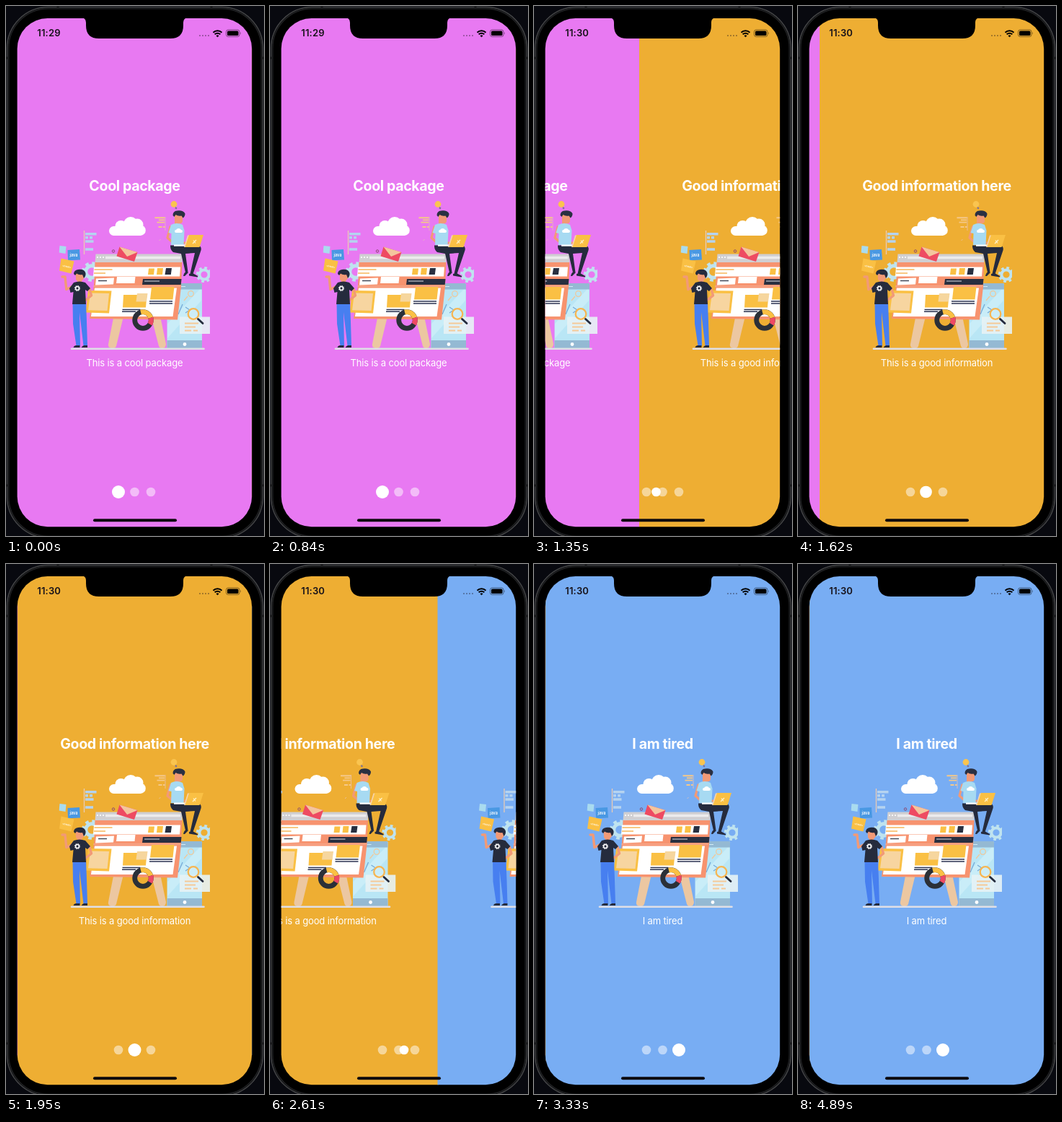
An HTML page for the animation above (4950 ms loop, 358 by 734 pixels).

```html
<!DOCTYPE html>
<html lang="en">
<head>
<meta charset="utf-8">
<title>Onboarding swipe</title>
<style>
  html, body { margin: 0; width: 100%; height: 100%; overflow: hidden; background: #08090f; }
  svg { display: block; width: 100%; height: 100%; font-family: Inter, "Open Sans", sans-serif; }
  .title { font-size: 19.6px; font-weight: 700; letter-spacing: -.37px; }
  .subtitle { font-size: 13px; letter-spacing: -.14px; }
  .title, .subtitle { fill: #fff; text-anchor: middle; }
</style>
</head>
<body>
<svg viewBox="0 0 358 734">
  <defs>
    <clipPath id="screen"><rect x="15.600" y="17" width="325.600" height="704.300" rx="42"/></clipPath>
    <clipPath id="artBox"><rect x="73.500" y="265" width="209.500" height="212"/></clipPath>

    <g id="gear" fill="none" stroke="#bfe3ef">
      <circle r="6.600" stroke-width="4"/>
      <circle r="9.300" stroke-width="3.600" stroke-dasharray="3.650 3.650"/>
    </g>

    <g id="art" clip-path="url(#artBox)">
      <!-- cloud -->
      <g fill="#fff">
        <circle cx="149.500" cy="311.500" r="6.500"/><circle cx="159.500" cy="305" r="8"/>
        <circle cx="173" cy="302" r="10"/><circle cx="182" cy="303" r="8.500"/>
        <circle cx="186.500" cy="310.700" r="7.300"/><rect x="149" y="305" width="38" height="13"/>
      </g>

      <!-- flow chart and code lines -->
      <path stroke="#e9cbb5" stroke-width="1.300" d="M108.500 311v33"/>
      <path stroke="#b5d3f0" stroke-width="3.600" d="M110 315.800h15.500M110 320.800h4M116 320.800h4M110 326h11.500M110 337h11"/>
      <path stroke="#f5c888" stroke-width="1.900" d="M206.500 293.200h14M212 296.400h8M209.500 299.600h10.500M211.500 306h5M218 306h2.500"/>
      <path stroke="#e6c0b2" stroke-width=".8" d="M221 292v19M212.500 325l2-2"/>

      <use href="#gear" transform="translate(119 368) scale(1.250)"/>
      <use href="#gear" x="275" y="372"/>

      <!-- device behind the board -->
      <rect x="223.500" y="384" width="48.500" height="90" rx="1.500" fill="#b9e6f5"/>
      <path fill="#c9edf8" d="M224 440l47-50v18l-47 52Z"/>
      <path fill="#94b9d3" d="M223.500 392.500V385.500q0-1.500 1.500-1.500h45.500q1.500 0 1.500 1.500v7ZM223.500 463H272v11h-48.500Z"/>
      <path stroke="#d3edf7" d="M238 388.500h11"/>
      <circle cx="248" cy="468.500" r="2.400" fill="#fff"/>
      <g fill="none" stroke="#76abd8" stroke-width="1.300">
        <path d="M239 427l6-14M249 417l6 4-6 4"/>
        <path stroke="#efc99c" d="M247 408l5-6"/>
        <circle cx="256.500" cy="398.500" r="3.800" stroke="#efc99c"/>
      </g>
      <rect x="241" y="430.500" width="42" height="23.500" fill="#e7f3f5" opacity=".9"/>
      <path stroke="#f5ca98" stroke-width="2" d="M248 439.500h19M248 444.500h15M248 449.500h9M260 449.500h6"/>
      <circle cx="260" cy="426.500" r="7.300" fill="#d9f2f9" fill-opacity=".6" stroke="#f6b653" stroke-width="2.300"/>
      <path stroke="#242b3d" stroke-width="2.800" stroke-linecap="round" d="M266.500 433.500l6.500 6"/>

      <!-- easel legs and ground -->
      <path fill="#ecc7a1" d="M149 432h13.500L153 471q-2 4-7 3t-4-6ZM202 432h12.500l7.500 36q0 5-4 6t-6-3Z"/>
      <path stroke="#dfdfe6" stroke-width="2.600" stroke-linecap="round" d="M91 474.800h183.500"/>

      <!-- board -->
      <path fill="#d0cfd2" d="M124.500 343.500H245l-.700 12H123.500Z"/>
      <path stroke="#ecebec" stroke-width="3.500" d="M138 348.500h104"/>
      <g fill="#fff"><circle cx="127" cy="348" r="1.100"/><circle cx="131" cy="348" r="1.100"/><circle cx="135" cy="348" r="1.100"/></g>
      <path fill="#f7936f" d="M123.500 355H244.500L243 388.500 238 434.500 116 433l6-46Z"/>
      <path fill="#fff" d="M122 361.500H242l-1 13H121ZM125 377.500l25-1-1 9-25 1ZM154 375h25.500l-1 9H153Z"/>
      <path stroke="#f7b85c" stroke-width="1.500" d="M122.500 365h25M122 370h16"/>
      <path fill="#fac044" d="M198 363.500h8l-1 8.500h-8ZM210 363h8l-1 9h-8Z"/>
      <path fill="#282f40" d="M222 363h8l-1.200 9H220.500ZM190 378h53.500l-.8 8H189Z"/>
      <path stroke="#434a59" stroke-width="1.500" d="M128 380.500h12"/>
      <path stroke="#e3e3e8" stroke-width="1.200" d="M192 381h21"/>
      <path stroke="#f5b29b" d="M121 388h121"/>
      <path fill="#fff" d="M123 390.500H237L231.500 430H118Z"/>

      <!-- board panels -->
      <path fill="#fac044" d="M114 394l32.500.500-3.500 31-32.500-1Z"/>
      <path fill="#f7d5a0" d="M117 397.500l26 .500-2.500 24-26.500-.800Z"/>
      <path fill="#fac044" d="M163 400h32.500l-1.500 17.500H162ZM202 389h31.500l-2 17.500H200Z"/>
      <path fill="#f6d69e" d="M182 398h14.500l-1.500 11.500H180.500Z"/>
      <path stroke="#2b3351" stroke-width="1.400" d="M199 409h32M199 412h32M161.500 420.500h25M161 423.300h19"/>
      <g fill="none" stroke-width="6.800" transform="translate(190 435)">
        <circle r="11.300" stroke="#2b3038"/>
        <path stroke="#fac044" d="M-3-10.900A11.300 11.300 0 0 1 10.800-3.200"/>
        <path stroke="#ee4964" d="M10.800-3.200A11.300 11.300 0 0 1 9.800 5.700"/>
      </g>

      <!-- envelope -->
      <path fill="#ee4b62" d="M157.500 333.500l25 7.500-4.500 13-24.500-7.500Z"/>
      <path fill="#f4c59d" d="M157.500 333.500l25 7.500-14.500 6Z"/>
      <circle cx="149" cy="339.500" r="1.700" fill="none" stroke="#8a476f"/>

      <!-- floating cards -->
      <path fill="#a9dbef" d="M74.500 332l9 1-1 10-9-1.500Z"/>
      <path fill="#4998e3" d="M85.500 338l16.500-1 1 14.500-17 .800Z"/>
      <path fill="#fac044" d="M76.500 349.500l18 4-4 17-16.500-4Z"/>
      <g fill="#fff" text-anchor="middle" font-weight="600">
        <text x="94" y="347" font-size="5.500">java</text>
        <text x="84" y="362" font-size="3.500" transform="rotate(12 84 362)">&lt;html&gt;</text>
      </g>

      <!-- standing person -->
      <g fill="none" stroke="#f29a76" stroke-linecap="round" stroke-linejoin="round">
        <path stroke-width="3.400" d="M78 375h4l1.800 17.500 8-4"/>
        <path stroke-width="3.400" d="M116 392l2.500 9-9 7"/>
      </g>
      <path fill="#f29a76" d="M96.500 369h11.500v8l-3 4v4h-6v-4l-2-2Z"/>
      <path fill="#252b3d" d="M94 371q0-5 6-6 9-1 10.500 5 .5 4-2.500 7l-2-5q-5 1-8-1.500l-2 2.500Z"/>
      <path fill="#477ff0" d="M92.500 411h18.500l1 26 1 33.500h-5.500L102 424l1 46.500h-5.500L93 440Z"/>
      <path fill="#252b3d" d="M94 383q8-3 16 0l7 8-4 4-3-2 1 20H92l1.500-17-4 1-1.500-6ZM93.500 473q1-3 4-3h5v3ZM104.500 473q2-3 4-3h4.500v3Z"/>
      <circle cx="99" cy="391" r="2.400" fill="none" stroke="#fff" stroke-width="1.500"/>
      <circle cx="99" cy="391" r="3.700" fill="none" stroke="#fff" stroke-width="1" stroke-dasharray="1.450"/>

      <!-- seated person with laptop -->
      <circle cx="233" cy="274.500" r="4.400" fill="#fac44f"/>
      <path fill="#7f7394" d="M235 278l2.500 1.500-1 2-2-1Z"/>
      <path fill="#f29a76" d="M234 289h11v9q-1 4-5 3l-1 4h-5Z"/>
      <path fill="#2a3042" d="M231.500 290q0-6 6-6.500 8-1 11 4 0 4-3 6l-2-3q-5 1-8-1.500l-2 3Z"/>
      <path fill="none" stroke="#f29a76" stroke-width="3.200" stroke-linecap="round" stroke-linejoin="round" d="M228 306l-4 15 9 8 15-1"/>
      <path fill="#a7daf2" d="M229 303q8-4 16 0l2.500 8-1 20H229l.500-16-4-1Z"/>
      <path fill="#fff" d="M236 314a2 2 0 0 1 0-4 4 4 0 0 1 7 0 2 2 0 0 1 0 4Z"/>
      <path fill="#252b3d" d="M228 331.500h38q6 1 4.500 7L259.500 371h-4L262 342l-13 1 3.500 26h-3.500L243 343l-11-2q-4-3-4-9ZM246 374q1-5 4-6l3 1-5 5ZM254 371l5-1 7 4v1.500l-12-2Z"/>
      <path fill="#fff" d="M233 330.500h22v2.200h-22Z"/>
      <path fill="#f7d4ac" d="M252 317.500h3L250 334h-3Z"/>
      <path fill="#fac044" d="M254 317h20l-5.500 17H248.500Z"/>
      <path stroke="#fff3cd" stroke-width="1.200" d="M259 329l5-5M260 324.500l3 4"/>
    </g>
  </defs>

  <!-- phone body -->
  <rect x="1.500" y="1.500" width="355" height="735" rx="57" fill="#000" stroke="#454648" stroke-width="1.500"/>
  <rect x="3.500" y="3.500" width="351" height="731" rx="55" fill="none" stroke="#1d1e20" stroke-width="2"/>
  <path stroke="#1a1b1d" stroke-width="3" d="M0 72h4M354 72h4M72 0v4M285 0v4M0 664h4M354 664h4"/>

  <g clip-path="url(#screen)">
    <g id="pages"></g>
    <g id="dots" fill="#fff"></g>
    <rect x="121" y="710.200" width="116" height="4" rx="2" fill="#0b080c"/>
  </g>

  <path d="M105 16Q111 17 111 23v4q0 18 18 18h99q18 0 18-18v-4q0-6 6-7Z"/>

  <!-- status bar -->
  <g fill="#17121a">
    <text id="clock" x="43.300" y="42.300" font-size="13" font-weight="600" letter-spacing=".150"></text>
    <g opacity=".45">
      <circle cx="269" cy="41" r="1"/><circle cx="273" cy="41" r="1"/><circle cx="277" cy="41" r="1"/><circle cx="281" cy="41" r="1"/>
    </g>
    <g fill="none" stroke="#000" stroke-width="2">
      <path d="M287.500 36.800a8.600 8.600 0 0 1 12 0M289.700 39.300a5.300 5.300 0 0 1 7.600 0"/>
    </g>
    <path fill="#000" d="M291.500 41.200a3 3 0 0 1 4 0l-2 2Z"/>
    <rect x="305.500" y="33" width="18.500" height="9.500" rx="2.800" fill="none" stroke="#000" stroke-opacity=".45"/>
    <rect x="307" y="34.500" width="15.500" height="6.500" rx="1.500" fill="#000"/>
    <path fill="#000" opacity=".5" d="M325 36q1.500 1.700 0 3.500Z"/>
  </g>
</svg>

<script>
  const LOOP = 4950, STEP = 30, PAGE_WIDTH = 325, DOT_START = 156, DOT_GAP = 22.5;
  const PAGES = [
    ['#e879f2', 'Cool package', 'This is a cool package'],
    ['#eeae33', 'Good information here', 'This is a good information'],
    ['#78adf3', 'I am tired', 'I am tired'],
  ];
  // Each swipe: a finger drag, then a damped settle; pairs of [time, distance].
  const SWIPES = [
    [[990, 0], [1080, 78], [1200, 125], [1320, 178], [1440, 250], [1530, 291], [1620, 311], [1740, 321], [1950, 325]],
    [[2400, 0], [2460, 18], [2610, 108.5], [2730, 190], [2850, 262], [2940, 302], [3060, 318], [3330, 325]],
  ];

  const byId = id => document.getElementById(id);
  const clamp01 = v => Math.min(1, Math.max(0, v));

  // Pages are one unit wider than their spacing so that the screen edge stays filled.
  byId('pages').innerHTML = PAGES.map(([color, title, subtitle], i) => `
    <g transform="translate(${i * PAGE_WIDTH})">
      <rect x="${i ? 16 : 15}" y="17" width="${PAGE_WIDTH + 1}" height="705" fill="${color}"/>
      <text class="title" x="178.500" y="255.500">${title}</text>
      <use href="#art"/>
      <text class="subtitle" x="178.500" y="498.600">${subtitle}</text>
    </g>`).join('');

  byId('dots').innerHTML = PAGES.map((_, i) =>
    `<circle cx="${DOT_START + i * DOT_GAP}" cy="673" r="6.300" opacity=".5"/>`).join('') +
    '<circle id="activeDot" cy="673"/>';

  // Smooth curve through the keys, at rest at both ends.
  function follow(keys, t) {
    const last = keys.length - 1;
    if (t <= keys[0][0]) return keys[0][1];
    if (t >= keys[last][0]) return keys[last][1];
    const slope = i => i === 0 || i === last ? 0
      : (keys[i + 1][1] - keys[i - 1][1]) / (keys[i + 1][0] - keys[i - 1][0]);
    const i = keys.findIndex(key => key[0] > t) - 1;
    const [t0, a] = keys[i], [t1, b] = keys[i + 1];
    const span = t1 - t0, u = (t - t0) / span;
    return a + (b - a) * u * u * (3 - 2 * u)
      + span * u * (1 - u) * (slope(i) * (1 - u) - slope(i + 1) * u);
  }

  function render(t) {
    const moved = SWIPES.map(keys => follow(keys, t));
    const offset = moved[0] + moved[1];
    byId('pages').setAttribute('transform', `translate(${-offset})`);

    // The active dot shrinks as a drag starts and grows back as the page settles.
    const shrink = SWIPES.reduce((most, keys, i) => {
      const pressed = clamp01((t - keys[0][0]) / 180);
      const unsettled = clamp01((PAGE_WIDTH - moved[i] - 3) / 45);
      return Math.max(most, Math.min(pressed, unsettled));
    }, 0);
    byId('activeDot').setAttribute('cx', DOT_START + DOT_GAP * offset / PAGE_WIDTH);
    byId('activeDot').setAttribute('r', 9 - 2.7 * shrink);
    byId('clock').textContent = t < 1020 ? '11:29' : '11:30';
  }

  function tick() {
    const t = performance.now() % LOOP;
    render(Math.floor(t / STEP) * STEP);
    requestAnimationFrame(tick);
  }
  tick();
</script>
</body>
</html>
```
